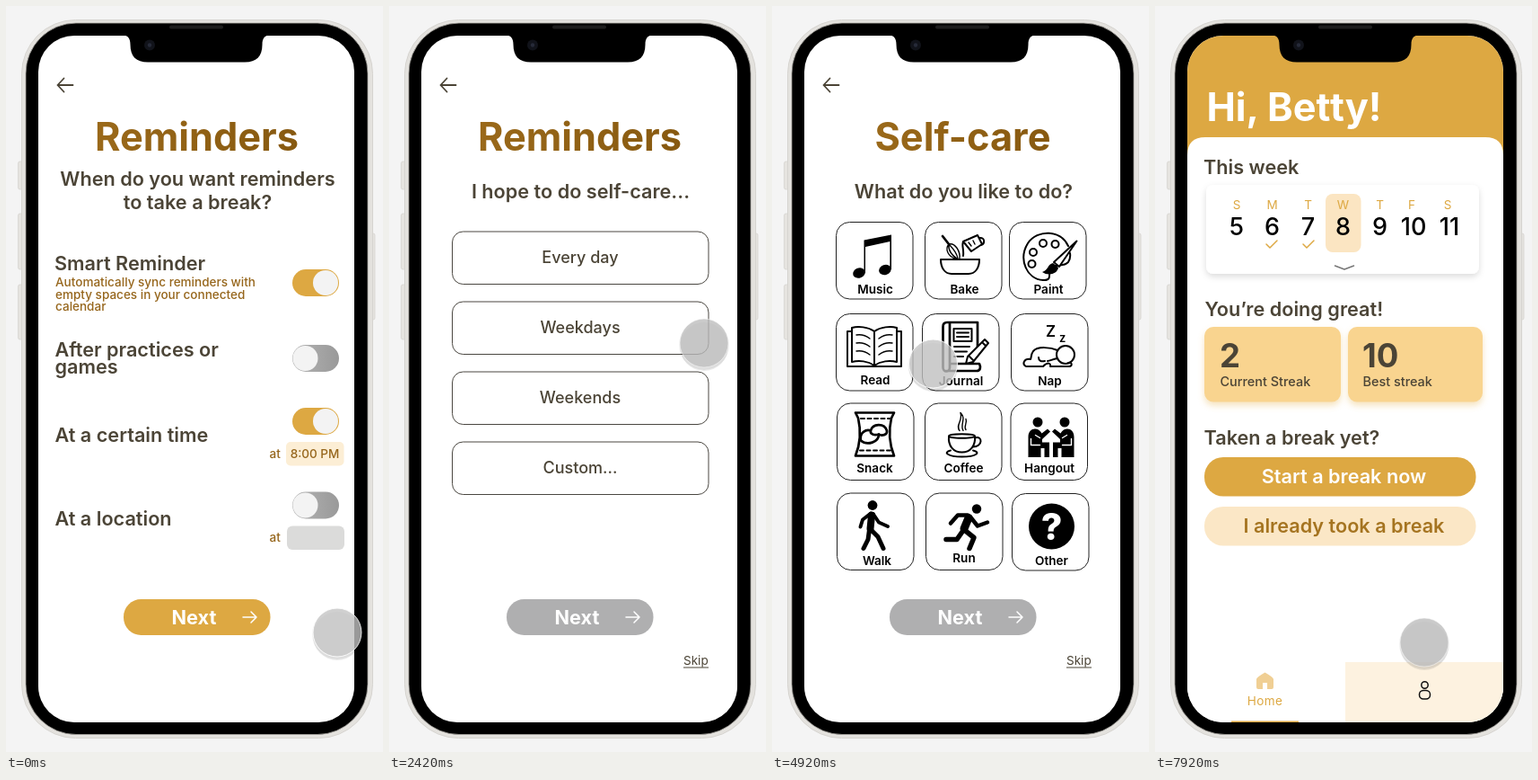
Recreate the animation shown at these times as an HTML page. Size 420x830 px, loop 8 s.

```html
<!DOCTYPE html>
<html lang="en">
<head>
<meta charset="utf-8">
<title>Break reminders</title>
<style>
html, body { margin: 0; width: 100%; height: 100%; overflow: hidden; background: #f4f4f4; }
svg { display: block; width: 420px; height: 830px; font-family: Inter, Roboto, sans-serif; }
.title { font-size: 43.33px; font-weight: 700; fill: url(#brown); }
.sub, .label { font-size: 21.66px; font-weight: 600; fill: #4b4436; }
.small { font-size: 13.54px; font-weight: 500; fill: #96661c; }
.skip { font-size: 13.54px; fill: #4b4436; }
.next { font-size: 21.66px; font-weight: 700; fill: #fff; }
.pill { fill: #afafb0; }
.on .pill, .gold { fill: #dda842; }
.line { fill: none; stroke: #4b4436; stroke-width: 1.8; stroke-linecap: round; stroke-linejoin: round; }
.option rect { fill: #fff; stroke: #4a4741; }
.option text { font-size: 18.05px; font-weight: 500; fill: #4b4436; }
.on .pick rect { fill: #dda842; stroke: #dda842; }
.on .pick text { fill: #fff; }
.card { --bg: #fff; color: #000; }
.on .card.pick { --bg: #dda842; color: #fff; }
.card > rect { fill: var(--bg); stroke: #222; }
.card > text { font-size: 13.54px; font-weight: 600; fill: currentColor; }
.icon { fill: none; stroke: currentColor; stroke-width: 2; stroke-linecap: round; stroke-linejoin: round; }
.icon .bold { stroke-width: 2.7; }
.icon .thin { stroke-width: 1.4; }
.icon .f { fill: currentColor; stroke: none; }
.icon .b { fill: var(--bg); }
.on .pick .icon rect { fill: none; }
.mid { text-anchor: middle; }
.day { font-size: 13.54px; fill: #dda842; }
.date { font-size: 27px; font-weight: 500; fill: #000; }
.count { font-size: 36.5px; font-weight: 700; fill: #4b4436; }
.streak { font-size: 14.45px; font-weight: 500; fill: #4b4436; }
</style>
</head>
<body>
<svg viewBox="0 0 420 830">
  <defs>
    <linearGradient id="brown"><stop stop-color="#9a691a"/><stop offset="1" stop-color="#875910"/></linearGradient>
    <linearGradient id="off"><stop stop-color="#b4b4b4"/><stop offset="1" stop-color="#999"/></linearGradient>
    <clipPath id="screen"><rect x="36" y="33" width="352" height="764" rx="40"/></clipPath>
    <filter id="soft" x="-20%" y="-20%" width="140%" height="150%"><feDropShadow dx="0" dy="3" stdDeviation="3.5" flood-color="#000" flood-opacity=".14"/></filter>
    <filter id="warm" x="-20%" y="-20%" width="140%" height="150%"><feDropShadow dx="0" dy="4" stdDeviation="3.5" flood-color="#e8b95c" flood-opacity=".4"/></filter>
  </defs>

  <rect width="420" height="830" fill="#f4f4f4"/>
  <g fill="#e6e4e0" stroke="#d3d1cd" stroke-width=".7">
    <rect x="13.5" y="173" width="6" height="31" rx="2"/>
    <rect x="13.5" y="231" width="6" height="62" rx="2"/>
    <rect x="13.5" y="310" width="6" height="61" rx="2"/>
    <rect x="405" y="253" width="6" height="96" rx="2"/>
  </g>
  <rect x="17.5" y="15.5" width="391" height="799" rx="60" fill="#e4e2de" stroke="#d6d4d0"/>
  <rect x="22" y="19" width="381" height="791.5" rx="56" fill="#000" stroke="#a5a29d" stroke-width=".8"/>
  <rect x="36" y="33" width="352" height="764" rx="40" fill="#fff"/>
  <g id="panes" clip-path="url(#screen)"></g>
  <path d="M130 32C136 33 138.500 36 138.500 43C138.500 56 145 62.500 158 62.500H266C279 62.500 285.500 56 285.500 43C285.500 36 288 33 294 32Z"/>
  <rect x="182" y="21.500" width="60" height="4" rx="2" fill="#1d1d1d"/>
  <circle cx="160" cy="43.500" r="6" fill="#11131a"/>
  <circle cx="160" cy="43.500" r="2.200" fill="#262a38"/>

  <g id="cursor">
    <circle cy="4" r="27" opacity=".08"/>
    <circle cy="2" r="28" opacity=".06"/>
    <circle id="dot" r="27" fill-opacity=".77" stroke="#fff"/>
  </g>
</svg>

<script>
const LOOP = 8000, STEP = 354, SLIDE = 300;
const byId = id => document.getElementById(id);

const text = (cls, x, y, s, extra = '') => `<text class="${cls}" x="${x}" y="${y}" ${extra}>${s}</text>`;
const box = (x, y, w, h, r, attrs) => `<rect x="${x}" y="${y}" width="${w}" height="${h}" rx="${r}" ${attrs}/>`;
const path = (d, cls = '') => `<path class="${cls}" d="${d}"/>`;
const dot = (x, y, r, cls = '') => `<circle class="${cls}" cx="${x}" cy="${y}" r="${r}"/>`;

const header = title => path('M57.500 88H74.500M64.500 80.500L57.500 88L64.500 95.500', 'line') + text('title mid', 212.5, 161, title);
const nextButton = () => box(131, 660, 163.5, 40, 19.5, 'class="pill"') + text('next mid', 209.5, 687.5, 'Next') +
  '<path class="line" style="stroke:#fff;stroke-width:1.5" d="M264 680H279M273 674L279 680L273 686"/>';
const skip = () => text('skip', 328, 733, 'Skip') + box(328, 735.5, 28, 1, 0, 'fill="#4b4436"');
const toggle = (y, on) => box(319, y - 15, 52, 30, 15, on ? 'class="gold"' : 'fill="url(#off)"') +
  `<circle cx="${on ? 356 : 333.5}" cy="${y}" r="14" fill="#f3f3f3"/>`;

function remindersPane() {
  return `<g class="on">${header('Reminders')}${nextButton()}</g>` +
    text('sub mid', 213.5, 200, 'When do you want reminders') + text('sub mid', 213.5, 226, 'to take a break?') +
    text('label', 54, 293.5, 'Smart Reminder') +
    ['Automatically sync reminders with', 'empty spaces in your connected', 'calendar']
      .map((s, i) => text('small', 55, 312 + i * 13.6, s)).join('') +
    text('label', 54.5, 389.5, 'After practices or') + text('label', 54.5, 409, 'games') +
    text('label', 54.5, 485, 'At a certain time') + text('label', 54.5, 578, 'At a location') +
    toggle(308, true) + toggle(392, false) + toggle(462, true) + toggle(555.5, false) +
    text('small', 293.5, 503, 'at') + text('small', 293.5, 596, 'at') +
    box(312, 485, 64.5, 26.5, 5, 'fill="#fceed5"') + text('small mid', 344, 503, '8:00 PM') +
    box(313, 578.5, 64, 26.5, 6, 'fill="#dbdbda"');
}

function daysPane() {
  const options = ['Every day', 'Weekdays', 'Weekends', 'Custom...'].map((s, i) =>
    `<g class="option ${i === 1 ? 'pick' : ''}">${box(70.5, 251 + i * 78, 285.5, 58.5, 12, '')}${text('mid', 213, 286 + i * 78, s)}</g>`);
  return header('Reminders') + text('sub mid', 213.5, 213.5, 'I hope to do self-care...') +
    options.join('') + nextButton() + skip();
}

const bookLines = [24, 33, 42].map(y => `M23 ${y}C29 ${y - 1} 34 ${y + 1} 38 ${y + 4}M63 ${y}C57 ${y - 1} 52 ${y + 1} 48 ${y + 4}`).join('');
const sitter = dot(30.5, 21.5, 5.5, 'f') +
  path('M20 38C20 26.500 32 27 35 34L41.500 29L44.500 32L35.500 40.500V44H43.500V60.500H38V50.500H34V60.500H20Z', 'f') +
  '<path class="thin" style="stroke:var(--bg)" d="M23 40V47H33M28 36L33 39"/>';
const limbs = (w, d) => `<path stroke-width="${w}" d="${d}"/>`;

const icons = {
  Music: '<ellipse class="f" cx="26" cy="57" rx="7" ry="5.500" transform="rotate(-20 26 57)"/><ellipse class="f" cx="55" cy="53.500" rx="7" ry="5.500" transform="rotate(-20 55 53.500)"/>' +
    path('M31.500 20.500L62 14.500V53H60.400V22L33 28V57H31.500Z', 'f'),
  Bake: path('M18 42H61C61 52 56 58 49 58H30C23 58 18 52 18 42Z') + path('M20 16L27 25', 'bold') +
    path('M27 25C22 31 27 39 34 41M27 25C34 23 40 33 39 41M27 25C26 32 31 38 36 41M27 25C31 29 36 35 37 41', 'thin') +
    path('M43 22L59 15L64 25L52 33ZM43 22C41 27 44 30 43 38M61 18C68 17 67 25 63 26') + path('M49 23L52 27M54 21L56 25', 'thin'),
  Paint: path('M66 27C58 9 32 8 21 24C10 42 20 64 38 65C50 66 42 55 47 51C54 46 60 51 66 45C68 42 68.500 38 68 35') +
    dot(27, 34, 4) + dot(38, 24, 4) + dot(51.5, 25, 4) + dot(25.5, 47, 4) +
    path('M75.500 21.500L50 45L56 50Z', 'b') + path('M49 46C43 47 44 54 37 56C44 61 54 58 55 51Z', 'f'),
  Read: path('M43 20C36 15 25 14 18 16V54C26 52 36 53 43 58C50 53 60 52 68 54V16C61 14 50 15 43 20V58M18 20H13V59H73V20H68') + path(bookLines, 'thin'),
  Journal: path('M62 38V10H28C25 10 23.500 12 23.500 15V60C23.500 66 31 66 31 60V10M31 56H64C66 60 65 64 61 64H27', 'bold') +
    box(35.5, 17, 20, 14, 0, '') + path('M39 21.500H52M39 26H52M36 37H53M36 42.500H50M36 48H46') +
    path('M70 29L51 48L49 56L57 54L74 33ZM53 48L57 52M67 32L71 36', 'b'),
  Nap: path('M52 41C45 38 30 36 25 42C22 46 23 50 22 51C15 50 12 56 17 59H36C41 54 45 55 44 59H64C69 59 69 54 64 55') +
    dot(61, 46, 10) + path('M31 49C31 53 34 54 38 53M52 50C46 51 44 53 41 53') +
    '<g class="f" font-weight="600"><text x="39" y="26" font-size="17">Z</text><text x="54" y="32" font-size="13">z</text></g>',
  Snack: path('M21 11H64L61 17C58 30 58 44 64 59H21C27 44 27 30 24 17Z', 'bold') + '<path stroke-dasharray="4 3.500" d="M27 17.500H59M26 53H60"/>' +
    path('M27 42C25 33 33 29 38 31C40 23 53 22 56 31C57 36 50 37 47 35C47 44 34 48 27 42ZM38 31C37 34 41 37 47 35', 'bold'),
  Coffee: path('M27 37C27 34 56 34 56 37C56 40 27 40 27 37C26 48 32 55 41.500 55C51 55 57 48 56 37M56 39C65 36 65 49 54 49M29 53C20 55 26 60 41.500 60C58 60 63 55 54 53') +
    path('M39 31C34 25 43 20 40 11C47 18 39 24 43 31M46 30C43 26 48 23 46 18', 'thin'),
  Hangout: sitter + `<g transform="translate(91 0) scale(-1 1)">${sitter}</g>`,
  Walk: dot(40, 14, 5.4, 'f') + limbs(8, 'M39 25L37.500 40') + limbs(5, 'M38 41L46 49L52 62M36.500 41L35 52L30 62') + limbs(4, 'M38 23L29 30L26.500 38M41 24L47 33L57 37.500'),
  Run: dot(57, 18, 5.2, 'f') + limbs(9, 'M48 28L43 40') + limbs(5.5, 'M44 42L54 50L49 62M42 42L35 52L23 52') + limbs(4.5, 'M47 25L36 25L28 34M50 27L58 37L69 33'),
  Other: dot(44.5, 37, 25.5, 'f') + '<text class="mid" x="44.500" y="52" font-size="41" font-weight="800" style="fill:var(--bg);stroke:none">?</text>'
};

// name, left, top, label centre, label baseline
const cards = [
  ['Music', 71.5, 240.5, 115, 320], ['Bake', 170.5, 240.5, 214.5, 320], ['Paint', 264.5, 240.5, 308, 320],
  ['Read', 71.5, 342.5, 115, 421], ['Journal', 167.5, 342.5, 210.5, 421.5], ['Nap', 266.5, 342.5, 309.5, 421.5],
  ['Snack', 72.5, 442, 114.5, 519], ['Coffee', 170.5, 442, 213.5, 519], ['Hangout', 266, 442, 309, 519],
  ['Walk', 72.5, 542, 117, 621.5], ['Run', 171.5, 542, 214, 619], ['Other', 267.5, 542.5, 311.5, 622]
];
const picks = ['Music', 'Read', 'Nap', 'Walk'];

function carePane() {
  return header('Self-care') + text('sub mid', 213.5, 213.5, 'What do you like to do?') +
    cards.map(([name, x, y, lx, ly]) => `<g class="card ${picks.includes(name) ? 'pick' : ''}">` +
      box(x, y, 85.5, 85.5, 15, '') + `<g class="icon" transform="translate(${x - .5} ${y - .5})">${icons[name]}</g>` +
      text('mid', lx, ly, name) + '</g>').join('') + nextButton() + skip();
}

function homePane() {
  const dates = [[91, 5], [130.5, 6], [170.5, 7], [209.5, 8], [250.5, 9], [288, 10], [328, 11]];
  return box(36, 33, 352, 150, 0, 'class="gold"') + '<path fill="#fff" d="M36 166Q36 146 56 146H368Q388 146 388 166V797H36Z"/>' +
    text('title', 57.5, 128, 'Hi, Betty!', 'style="fill:#fff"') + text('sub', 54, 187, 'This week') +
    box(57, 199, 304, 99, 8, 'fill="#fff" filter="url(#soft)"') + box(190, 209, 39.5, 65, 8, 'fill="#fbe5c2"') +
    dates.map(([x, n], i) => text('day mid', i > 4 ? x - 2 : x, 226, 'SMTWTFS'[i]) + text('date mid', x, 255, n)).join('') +
    [130, 171].map(x => `<path class="line" style="stroke:#dda842;stroke-width:1.500" d="M${x - 6} 265L${x - 2} 269L${x + 6} 261"/>`).join('') +
    '<path class="line" style="stroke:#777;stroke-width:1.500" d="M200.500 289L211 293L221.500 289"/>' +
    text('sub', 55.5, 345, 'You’re doing great!') +
    box(55, 357, 152, 83.5, 10, 'fill="#f9d48f" filter="url(#warm)"') + box(215, 357, 150, 83.5, 10, 'fill="#f9d48f" filter="url(#warm)"') +
    text('count', 72, 402, '2') + text('streak', 72.5, 423, 'Current Streak') +
    text('count', 231, 402, '10') + text('streak', 231.5, 423, 'Best streak') +
    text('sub', 54.5, 488, 'Taken a break yet?') +
    box(55, 502, 302.5, 43.5, 21, 'class="gold"') + text('sub mid', 210.5, 530.5, 'Start a break now', 'style="fill:#fff"') +
    box(55, 557, 302.5, 43.5, 21, 'fill="#fbe7c6"') + text('sub mid', 210.5, 586, 'I already took a break', 'style="fill:#a57420"') +
    box(212, 730, 176, 67, 0, 'fill="#fdf2e0"') + box(85, 795.5, 75, 2, 0, 'class="gold"') +
    '<path fill="#f0cf94" d="M113 749Q113 747 122.500 741.500Q132 747 132 749V758Q132 760 130 760H125V753H120V760H115Q113 760 113 758Z"/>' +
    text('day mid', 122.5, 778, 'Home', 'letter-spacing=".4"') +
    '<g class="line" style="stroke:#111;stroke-width:1.500"><circle cx="300.500" cy="755.500" r="3.700"/><rect x="294.500" y="761.500" width="12" height="9.500" rx="4.500"/></g>';
}

byId('panes').innerHTML = [remindersPane, daysPane, carePane, homePane].map((make, i) =>
  `<g id="pane${i}">${i ? box(34.5, 33, 1, 764, 0, 'fill="#777"') : ''}${make()}</g>`).join('');
const panes = [0, 1, 2, 3].map(i => byId('pane' + i));

const slides = [926, 3600, 7570];
const presses = [[650, 1060], [2360, 2620], [3440, 3660], [5290, 5500], [7290, 7980]];
const home = [369, 697];
// start, end, x, y
const moves = [[0, 500, 306, 709], [1420, 2200, 351, 375], [2750, 3380, 297, 697], [4300, 5150, 154, 333], [5800, 6720, 300, 708]];

const clamp = v => Math.min(1, Math.max(0, v));
const easeOut = u => 1 - (1 - u) ** 2;
const easeInOut = u => u * u * (3 - 2 * u);

function draw(t) {
  const pos = slides.reduce((sum, s) => sum + easeOut(clamp((t - s) / SLIDE)), 0);
  panes.forEach((p, i) => {
    p.setAttribute('transform', `translate(${(i - pos) * STEP} 0)`);
    p.style.display = Math.abs(i - pos) < 1 ? '' : 'none';
  });
  panes[1].classList.toggle('on', t >= 2500);
  panes[2].classList.toggle('on', t >= 5420);

  let [x, y] = home;
  for (const [a, b, tx, ty] of moves) {
    const k = easeInOut(clamp((t - a) / (b - a)));
    x += (tx - x) * k;
    y += (ty - y) * k;
  }
  const press = Math.max(...presses.map(([a, b]) => clamp(Math.min(t - a, b - t) / 80)));
  byId('cursor').setAttribute('transform', `translate(${x} ${y})`);
  const shade = 200 - 11 * press;
  byId('dot').setAttribute('fill', `rgb(${shade},${shade},${shade})`);
  byId('dot').setAttribute('stroke-opacity', .85 - .5 * press);
}

const start = performance.now();
function tick() {
  draw((performance.now() - start) % LOOP);
  requestAnimationFrame(tick);
}
tick();
</script>
</body>
</html>
```
